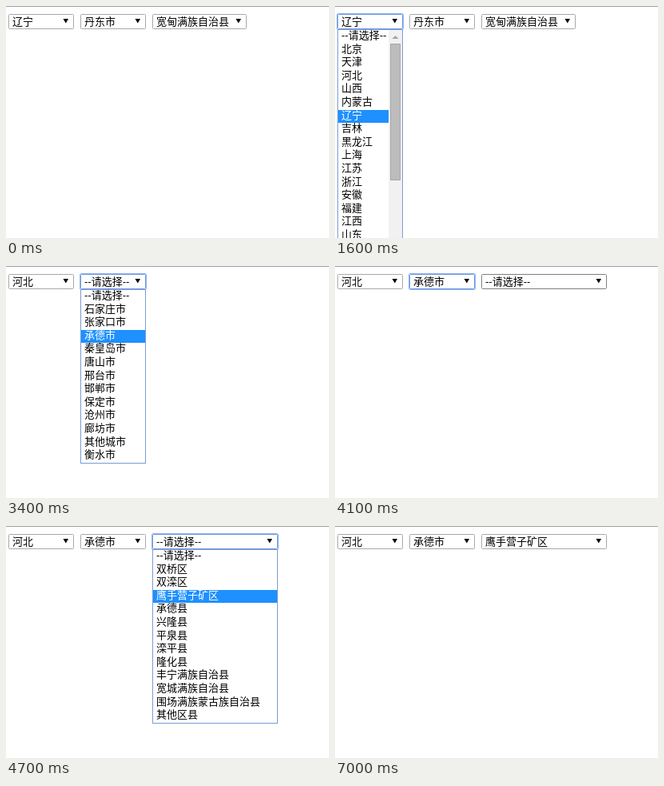
Animation, 404 px wide and 290 px high, one loop 7.1 s. Source, as an HTML page:

```html
<!DOCTYPE html>
<html lang="zh-CN">
<head>
<meta charset="utf-8">
<style>
html, body { margin: 0; width: 100%; height: 100%; overflow: hidden; background: #fff; }
svg { display: block; }
text { font: 13px "Liberation Sans", "Noto Sans CJK SC", "Noto Sans CJK", sans-serif; white-space: pre; }
</style>
</head>
<body>
<svg id="stage" width="404" height="290" viewBox="0 0 404 290"></svg>
<script>
const LOOP = 7100, ROW = 16.6, LIST_TOP = 30;
const PROMPT = '--请选择--';
const LEFT = [3, 93, 183];

const OPTIONS = [
  '北京 天津 河北 山西 内蒙古 辽宁 吉林 黑龙江 上海 江苏 浙江 安徽 福建 江西 山东',
  '石家庄市 张家口市 承德市 秦皇岛市 唐山市 邢台市 邯郸市 保定市 沧州市 廊坊市 其他城市 衡水市',
  '双桥区 双滦区 鹰手营子矿区 承德县 兴隆县 平泉县 滦平县 隆化县 丰宁满族自治县 宽城满族自治县 围场满族蒙古族自治县 其他区县'
].map(names => [PROMPT, ...names.split(' ')]);

// Each entry changes part of the state; select indices are 0..2, -1 means none.
const TIMELINE = [
  [0, { values: ['辽宁', '丹东市', '宽甸满族自治县'], lastWidth: 118, hover: -1, focus: -1, open: -1, row: 0 }],
  [400, { hover: 2 }],
  [500, { hover: 1 }],
  [600, { hover: 0 }],
  [1500, { focus: 0 }],
  [1600, { open: 0, row: 6 }],
  [1900, { row: 2 }],
  [2000, { row: 3 }],
  [2500, { open: -1, hover: -1, values: ['河北', PROMPT] }],
  [2800, { hover: 1 }],
  [3200, { focus: 1, open: 1, row: 0 }],
  [3400, { row: 3 }],
  [3800, { open: -1, hover: -1, values: ['河北', '承德市', PROMPT], lastWidth: 157 }],
  [4100, { hover: 2 }],
  [4400, { focus: 2, open: 2, row: 0 }],
  [4600, { row: 2 }],
  [4700, { row: 3 }],
  [5100, { open: -1, hover: -1, values: ['河北', '承德市', '鹰手营子矿区'] }],
  [7000, { focus: -1 }]
];

const rect = (x, y, w, h, fill) => `<rect x="${x}" y="${y}" width="${w}" height="${h}" fill="${fill}"/>`;
const frame = (x, y, w, h, stroke, radius = 0, fill = 'none') =>
  `<rect x="${x + .5}" y="${y + .5}" width="${w - 1}" height="${h - 1}" rx="${radius}" fill="${fill}" stroke="${stroke}"/>`;
const label = (x, y, text, fill = '#000') => `<text x="${x}" y="${y}" fill="${fill}">${text}</text>`;
const polygon = (points, fill) => `<polygon points="${points}" fill="${fill}"/>`;

function drawSelect(x, w, value, hovered, focused) {
  const right = x + w;
  const border = focused ? '#6f98dc' : hovered ? '#808080' : '#a9a9a9';
  return frame(x, 10, w, 19, border, 1, '#fff')
    + (focused ? frame(x - 1, 9, w + 2, 21, '#8fb4f4', 1.5) : '')
    + label(x + 5, 24, value)
    + polygon(`${right - 13.5},16 ${right - 7},16 ${right - 10.2},21.5`, '#000');
}

function drawScrollbar(x) {
  return rect(x, LIST_TOP, 17, 260, '#f1f1f1')
    + polygon(`${x + 4.5},41 ${x + 12.5},41 ${x + 8.5},37`, '#a3a3a3')
    + frame(x + 2, 47, 13, 171, '#a8a8a8', 0, '#bcbcbc');
}

function drawList(index, x, w, active) {
  const scrolls = index === 0;
  const innerWidth = w - (scrolls ? 19 : 2);
  const rows = OPTIONS[index].map((name, i) => {
    const top = Math.round(LIST_TOP + i * ROW);
    const bottom = Math.round(LIST_TOP + (i + 1) * ROW);
    const on = i === active;
    return (on ? rect(x + 1, top, innerWidth, bottom - top, '#1e90ff') : '')
      + label(x + 5, top + 11, name, on ? '#fff' : '#000');
  });
  return frame(x, 29, w, scrolls ? 300 : 218, '#7a9bd6', 0, '#fff')
    + rows.join('') + (scrolls ? drawScrollbar(x + w - 18) : '');
}

function draw(state) {
  const width = i => i === 2 ? state.lastWidth : 82;
  const selects = state.values.map((value, i) =>
    drawSelect(LEFT[i], width(i), value, i === state.hover, i === state.focus));
  const list = state.open < 0 ? '' : drawList(state.open, LEFT[state.open], width(state.open), state.row);
  return rect(0, 0, 404, 1, '#a0a0a0') + selects.join('') + list;
}

const stage = document.getElementById('stage');
let shown = -1;

function tick() {
  const time = performance.now() % LOOP;
  const passed = TIMELINE.filter(([start]) => start <= time);
  if (passed.length !== shown) {
    shown = passed.length;
    stage.innerHTML = draw(Object.assign({}, ...passed.map(([, change]) => change)));
  }
  requestAnimationFrame(tick);
}
tick();
</script>
</body>
</html>
```
